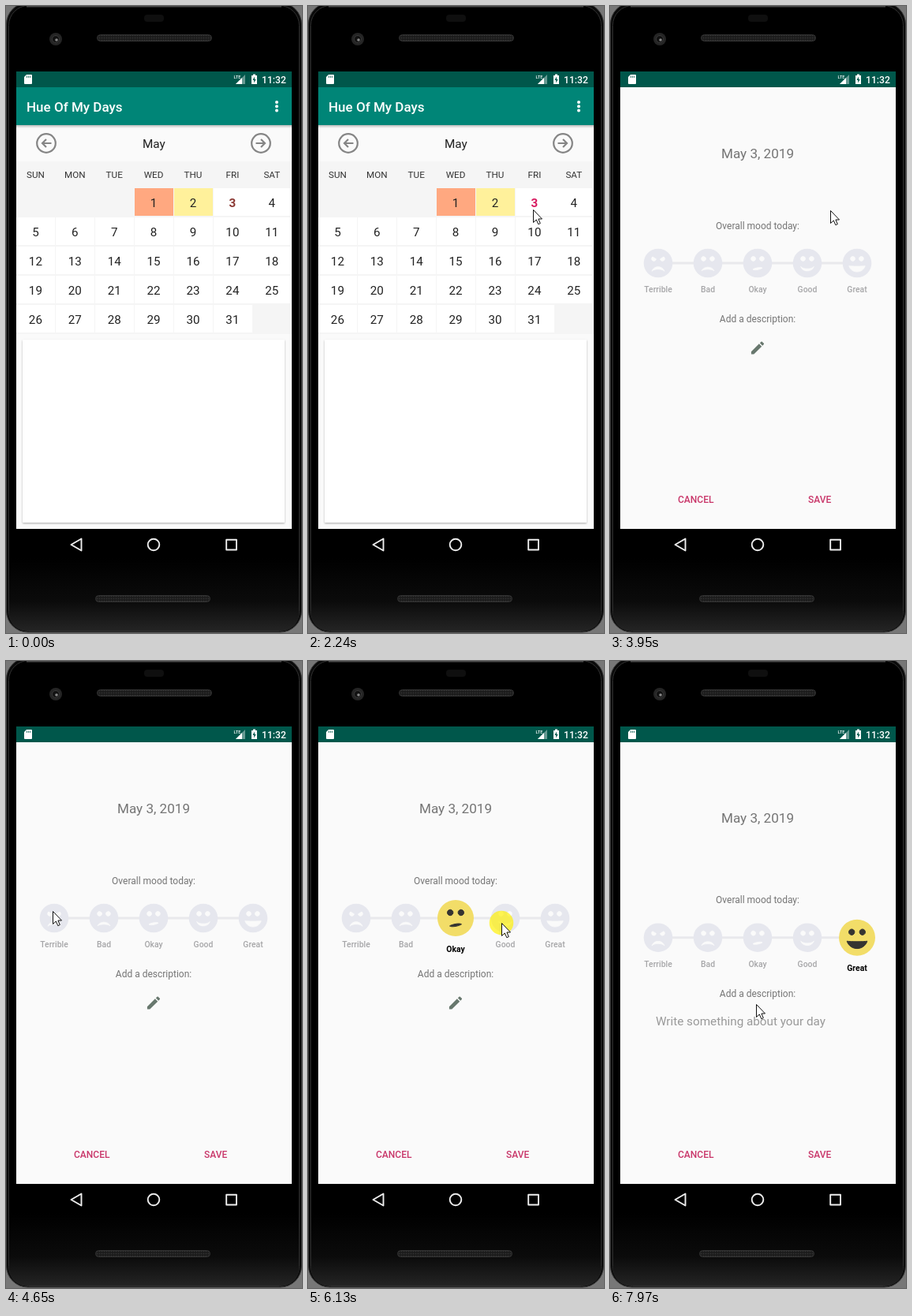
Write an HTML page that moves like this. It is 375x795 px and loops after 8 s.

```html
<!DOCTYPE html>
<html lang="en">
<head>
<meta charset="utf-8">
<title>Mood calendar</title>
<style>
  html, body { margin: 0; width: 100%; height: 100%; overflow: hidden; background: #000; }
  svg { display: block; width: 375px; height: 795px; font-family: Roboto, sans-serif; }
  .mid { text-anchor: middle; }
  .medium { font-weight: 500; }
</style>
</head>
<body>
<svg id="stage" viewBox="0 0 375 795">
  <defs>
    <linearGradient id="chin" x1="0" y1="0" x2="0" y2="1">
      <stop offset="0" stop-color="#000"/><stop offset=".6" stop-color="#0b0b0b"/><stop offset="1" stop-color="#242424"/>
    </linearGradient>
    <linearGradient id="shade" x1="0" y1="0" x2="0" y2="1">
      <stop offset="0" stop-opacity=".25"/><stop offset="1" stop-opacity="0"/>
    </linearGradient>
    <pattern id="mesh" width="3" height="3" patternUnits="userSpaceOnUse">
      <rect width="3" height="3" fill="#1c1c1c"/><circle cx="1.5" cy="1.5" r=".8" fill="#343434"/>
    </pattern>
    <filter id="soft" x="-5%" y="-5%" width="110%" height="110%">
      <feDropShadow dx="0" dy="1.2" stdDeviation="1.2" flood-opacity=".3"/>
    </filter>
    <clipPath id="screen"><rect x="13" y="83" width="349" height="595"/></clipPath>
  </defs>

  <g id="phone">
    <rect width="375" height="795" fill="#777"/>
    <rect x=".5" y="-4" width="374" height="798" rx="27" fill="#0a0a0a" stroke="#3c3c3c"/>
    <rect x="3.5" y="-.5" width="368" height="793" rx="25" fill="#000" stroke="#303030"/>
    <path d="M4 700H371V768Q371 792 347 792H28Q4 792 4 768Z" fill="url(#chin)"/>
    <path d="M26 .7H349" stroke="#484848" stroke-width="1.4"/>
    <rect x="175" y="11" width="25" height="9" rx="4" fill="#0f0f0f"/>
    <circle cx="63" cy="42" r="8" fill="#252525"/>
    <circle cx="63" cy="42" r="4.5" fill="#111" stroke="#3a3a3a"/>
    <circle cx="64" cy="43" r="1.8" fill="#888"/>
    <rect x="115.5" y="36.5" width="145" height="8" rx="4" fill="url(#mesh)" stroke="#333"/>
    <rect x="113.5" y="747.5" width="145" height="8" rx="4" fill="url(#mesh)" stroke="#333"/>
  </g>

  <g id="calendar">
    <rect x="13" y="83" width="349" height="580" fill="#fafafa"/>
    <rect x="13" y="83" width="349" height="20" fill="#00574b"/>
    <rect x="13" y="103" width="349" height="48" fill="#008577"/>
    <rect x="13" y="151" width="349" height="4" fill="url(#shade)"/>
    <text class="medium" x="26" y="133.5" font-size="17" fill="#fff">Hue Of My Days</text>
    <g fill="#fff"><circle cx="343" cy="122" r="2"/><circle cx="343" cy="127.2" r="2"/><circle cx="343" cy="132.4" r="2"/></g>
    <g fill="none" stroke="#858585" stroke-width="2.2">
      <circle cx="51" cy="174" r="11.8"/><path d="M57.5 174H46M51 169L46 174L51 179"/>
      <circle cx="323" cy="174" r="11.8"/><path d="M316.5 174H328M323 169L328 174L323 179"/>
    </g>
    <text class="mid" x="187.3" y="179.5" font-size="15.3" fill="#222">May</text>
    <rect x="13" y="197" width="349" height="219" fill="#f5f5f5"/>
    <g id="days" class="mid"></g>
    <rect x="21" y="423" width="332" height="232" rx="1" fill="#fff" filter="url(#soft)"/>
  </g>

  <g fill="none" stroke="#eee" stroke-width="1.9" stroke-linejoin="round">
    <path d="M82.5 683L95.5 675.5V690.5Z"/><circle cx="187" cy="683" r="7.3"/><rect x="279.2" y="676.7" width="12.8" height="12.8"/>
  </g>

  <g clip-path="url(#screen)">
    <g id="entry">
      <rect x="13" y="83" width="349" height="20" fill="#00574b"/>
      <rect x="13" y="103" width="349" height="560" fill="#fafafa"/>
      <text id="date" class="mid" x="187" y="193" font-size="17.1" fill="#757575">May 3, 2019</text>
      <g id="moods" class="mid">
        <text x="187" y="282.5" font-size="12" fill="#757575">Overall mood today:</text>
        <path d="M61 326H313" stroke="#e9e9ec" stroke-width="3"/>
      </g>
      <text id="prompt" class="mid" x="187" y="401" font-size="12" fill="#757575">Add a description:</text>
      <path id="pencil" transform="translate(176.2 422.7) scale(.9)" fill="#68786e"
        d="M3 17.25V21h3.75L17.81 9.94l-3.75-3.75zM20.71 7.04c.39-.39.39-1.02 0-1.41l-2.34-2.34c-.39-.39-1.02-.39-1.41 0l-1.83 1.83 3.75 3.75z"/>
      <text id="hint" x="58" y="462" font-size="15.25" fill="#999">Write something about your day</text>
      <g class="medium" font-size="12" fill="#c9376a"><text x="86" y="630">CANCEL</text><text x="251" y="630">SAVE</text></g>
    </g>
  </g>

  <g id="status" fill="#fff">
    <path d="M26 87H32Q33 87 33 88V98Q33 99 32 99H24Q23 99 23 98V90Z"/>
    <path d="M26.5 88.5V91M28.5 88.5V91M30.5 88.5V91" stroke="#00574b" stroke-width=".8"/>
    <text class="medium" x="288.5" y="92" font-size="5.5">LTE</text>
    <path d="M303 87V99H291Z" opacity=".4"/><path d="M299 91V99H291Z"/>
    <path d="M311 88H313V86.5H316V88H318V99H311Z"/>
    <path d="M315 89.5L312.5 94H314.2V97.5L316.7 93H315Z" fill="#00574b"/>
    <text class="medium" x="324" y="97.7" font-size="12.2">11:32</text>
  </g>

  <g id="pointer">
    <circle id="press" r="15.3" fill="#fff000" opacity=".68"/>
    <path d="M.5 .5V16.5L4.3 13L6.8 18.7L9.3 17.6L6.9 12H11.5Z" fill="#fff" stroke="#111" stroke-linejoin="round"/>
  </g>
</svg>

<script>
const LOOP = 8000, TICK = 77.4, LEAD = 15;   // the picture advances in ticks of 77.4 ms
const $ = id => document.getElementById(id);
const clamp = v => Math.max(0, Math.min(1, v));
const ease = v => (1 - Math.cos(Math.PI * clamp(v))) / 2;
const lerp = (a, b, k) => a + (b - a) * k;
const mix = (a, b, k) => `rgb(${a.map((v, i) => Math.round(lerp(v, b[i], k)))})`;

function add(parent, tag, attrs, text = '') {
  const el = document.createElementNS('http://www.w3.org/2000/svg', tag);
  set(el, attrs);
  el.textContent = text;
  return parent.appendChild(el);
}
function set(el, attrs) {
  for (const key in attrs) el.setAttribute(key, attrs[key]);
}
const show = (el, on) => set(el, { visibility: on ? 'visible' : 'hidden' });

// Calendar grid: the first of the month is a Wednesday
const columnX = i => 13 + i * 49.9;
['SUN', 'MON', 'TUE', 'WED', 'THU', 'FRI', 'SAT'].forEach((name, i) =>
  add($('days'), 'text', { x: columnX(i) + 24.4, y: 218.2, 'font-size': 11.7, fill: '#333' }, name));
let today;
for (let day = 1; day <= 31; day++) {
  const slot = day + 2, x = columnX(slot % 7), y = Math.round(231 + 37.1 * Math.floor(slot / 7));
  const fill = { 1: '#ffa880', 2: '#fff19b' }[day] || '#fff';
  add($('days'), 'rect', { x: Math.round(x), y, width: 49, height: 35, fill });
  const label = add($('days'), 'text', { x: x + 24.4, y: y + 23.7, 'font-size': 15.2, fill: '#222' }, day);
  if (day === 3) { today = label; set(label, { 'font-weight': 700 }); }
}

// Mood shapes: mouth half width, left y, right y, upper bend, lower bend, anger
const MOODS = [
  ['Terrible', [10, 13, 13, -9.5, -4.5, 1]],
  ['Bad', [10, 12.5, 12.5, -8, -3.5, .45]],
  ['Okay', [7.5, 10, 7.8, -2, 2, 0]],
  ['Good', [10.5, 5.5, 5.5, 4.7, 9.3, 0]],
  ['Great', [12.8, 4.5, 4.5, .8, 12.5, 0]]
];
const moodX = p => 61 + 63 * p;

function eye(side, anger) {
  const r = 3.7, gap = .01 + anger * 1.15, dir = -Math.PI / 2 - side * .55;
  const at = a => `${side * 6.8 + r * Math.cos(a)} ${-7 + r * Math.sin(a)}`;
  return `M${at(dir + gap)}A${r} ${r} 0 1 1 ${at(dir - gap)}Z`;
}
function features(p) {
  const i = Math.min(3, Math.floor(p));
  const [w, l, r, up, low, anger] = MOODS[i][1].map((v, k) => lerp(v, MOODS[i + 1][1][k], p - i));
  const c = w * .7;
  return eye(-1, anger) + eye(1, anger) +
    `M${-w} ${l}C${-c} ${l + up} ${c} ${r + up} ${w} ${r}C${c} ${r + low} ${-c} ${l + low} ${-w} ${l}Z`;
}
function makeFace(fill, ink) {
  const g = add($('moods'), 'g', {});
  const disc = add(g, 'circle', { r: 23, fill });
  const marks = add(g, 'path', { fill: ink, stroke: ink, 'stroke-width': 1, 'stroke-linejoin': 'round' });
  return { g, disc, marks };
}
const place = (face, p, scale) =>
  set(face.g, { transform: `translate(${moodX(p)} 326) scale(${scale})` });

const SMALL = 18.3 / 23;
const choices = MOODS.map(([name], i) => {
  const face = makeFace('#e6e7ee', '#fafafa');
  set(face.marks, { d: features(i) });
  const label = add($('moods'), 'text', { x: moodX(i), 'font-size': 10.4 }, name);
  return { face, label };
});
const active = makeFace('#f2dd68', '#353431');

// Timeline, in ticks
const PATH = [
  [10, 318, 748], [20, 277, 273], [22, 285, 258], [50, 285, 258], [60, 59, 317], [62, 59, 317],
  [66, 126, 330], [68, 126, 330], [72, 194, 330], [73, 194, 330], [78, 245, 332], [80, 245, 332],
  [83, 304, 351], [84, 310, 341], [91, 310, 341], [99, 195, 432], [100, 185, 435]
];
const PRESSES = [28, 61, 67, 72, 79, 89, 101];
const SLIDES = [68.15, 73.15, 80.15, 90.15], SLIDE_TICKS = 3.23;

function pointerAt(tick) {
  const next = PATH.findIndex(key => key[0] > tick);
  if (next < 0) return PATH[PATH.length - 1].slice(1);
  const [t0, x0, y0] = PATH[next - 1], [t1, x1, y1] = PATH[next];
  const k = ease((tick - t0) / (t1 - t0));
  return [lerp(x0, x1, k), lerp(y0, y1, k)];
}

function drawMoods(tick) {
  const grow = ease((tick - 60.2) / 1.7);
  const p = SLIDES.reduce((sum, start) => sum + ease((tick - start) / SLIDE_TICKS), 0);
  choices.forEach(({ face, label }, i) => {
    const d = Math.abs(p - i);
    const near = grow * clamp(1 - d * 1.6);
    place(face, i, SMALL * (grow ? Math.min(1, d * 1.3) : 1));
    set(label, {
      y: 363 + 5.5 * near,
      fill: mix([166, 166, 168], [0, 0, 0], near),
      'font-weight': near > .95 ? 700 : 500
    });
  });
  show(active.g, grow > 0);
  place(active, p, lerp(SMALL, 1, grow));
  set(active.disc, { fill: mix([242, 154, 104], [242, 221, 104], clamp(p)) });
  set(active.marks, { d: features(p) });
}

function draw(tick) {
  set(today, { fill: tick < 28 ? '#8c3a35' : '#d81b60' });

  const entering = { 42: [13, .87], 43: [3, 1] }[tick] || [0, 1];
  show($('entry'), tick >= 42);
  set($('entry'), { transform: `translate(0 ${entering[0]})`, opacity: entering[1] });
  if (tick >= 42) drawMoods(tick);
  else show(active.g, false);

  const open = clamp((tick - 101) / 2);
  const shift = (id, dy) => set($(id), { transform: `translate(0 ${dy * open})` });
  shift('date', 12);
  shift('moods', 24.7);
  shift('prompt', 24.5);
  set($('pencil'), { opacity: open ? 0 : 1 });
  set($('hint'), { opacity: open });

  show($('pointer'), tick >= 10);
  set($('press'), { opacity: PRESSES.includes(tick) ? .68 : 0 });
  if (tick >= 10) set($('pointer'), { transform: `translate(${pointerAt(tick).map(Math.round).join(' ')})` });
}

const start = performance.now();
let shown = -1;
function frame() {
  const tick = Math.floor(((performance.now() - start) % LOOP + LEAD) / TICK);
  if (tick !== shown) draw(shown = tick);
  requestAnimationFrame(frame);
}
frame();
</script>
</body>
</html>
```
